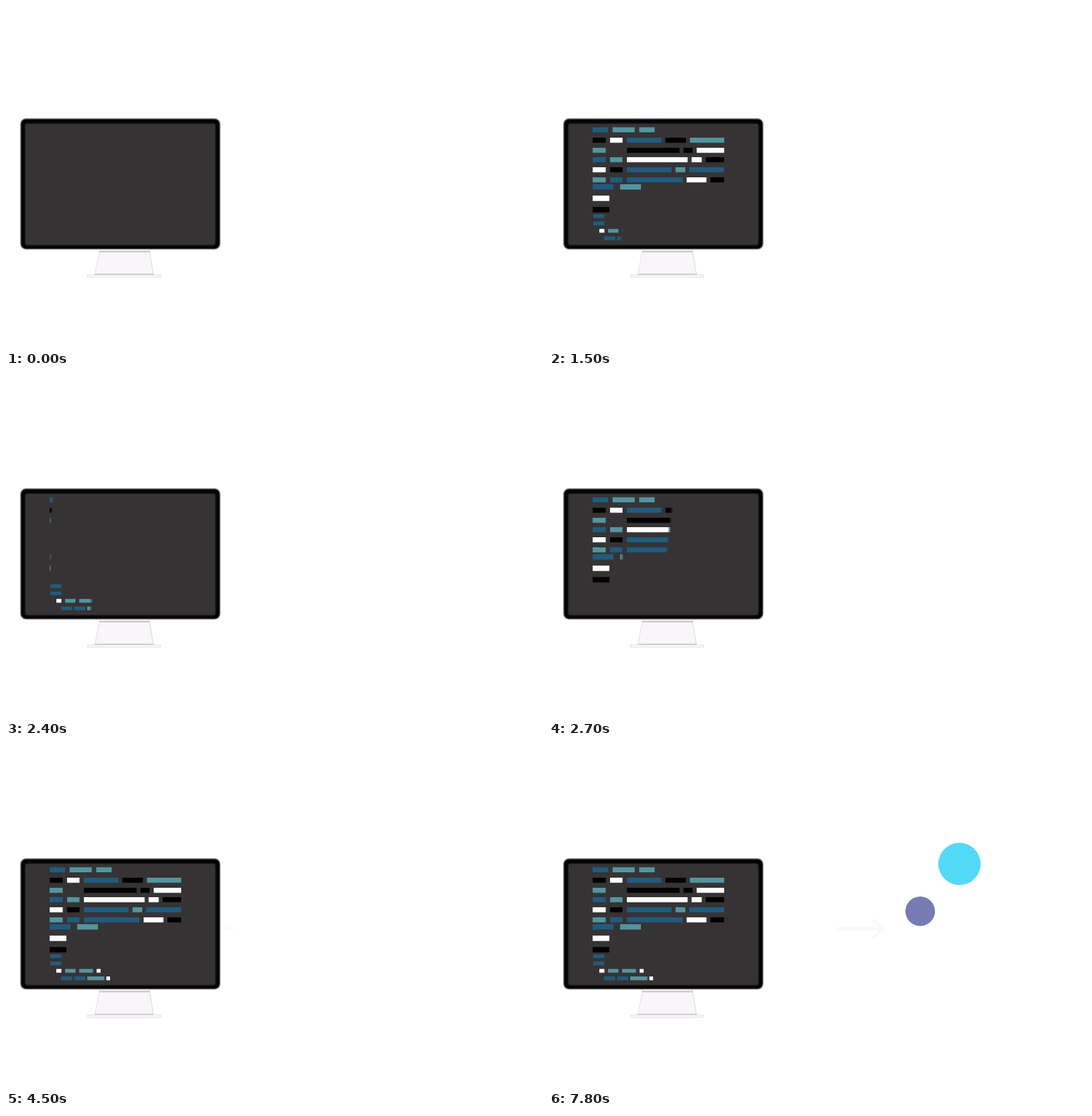
Recreate the animation shown at these times as an HTML page with a canvas. Size 800 px wide and 509 px high, loop 8000 ms.

```html
<!DOCTYPE html>
<html lang="en">
<head>
<meta charset="utf-8">
<title>Code on a monitor</title>
<style>
  html, body { margin: 0; width: 100%; height: 100%; overflow: hidden; background: #fff; }
  canvas { display: block; }
</style>
</head>
<body>
<canvas id="stage" width="800" height="509"></canvas>
<script>
const ctx = document.getElementById('stage').getContext('2d');
const LOOP = 8000, STEP = 100;
const COLORS = { B: '33,91,125', T: '83,149,159', K: '0,0,0', W: '255,255,255' };
const SCREEN = '#363335';

const clamp = v => Math.min(1, Math.max(0, v));
const ramp = (t, start, length) => clamp((t - start) / length);

// Bars laid out one after another; each word is a colour and a width.
function flow(x, y, gap, words) {
  return words.split(' ').map(word => {
    const w = +word.slice(1);
    const bar = { c: COLORS[word[0]], x, y, w };
    x += w + gap;
    return bar;
  });
}

// Two narrow columns, then three bars that share the rest of the line.
function codeLine(colors, index, split1, split2) {
  const starts = [65, 91, 116, split1, split2];
  const ends = [84.5, 109.5, split1 - 6, split2 - 6, 261];
  const y = Math.round(195.8 + 14.7 * index);
  return [...colors].map((c, i) => ({ c: COLORS[c], x: starts[i], y, w: ends[i] - starts[i] }))
    .filter(bar => bar.c);
}

const mainShare = t => ramp(t, 660, 600) - ramp(t, 1760, 700) + ramp(t, 2470, 400);
const tailShare = t => ramp(t, 1310, 400) - ramp(t, 2260, 400) + ramp(t, 2800, 400);

const groups = [
  { x: 65, w: 196, mid: 220, h: 7.5, share: mainShare, bars: [
    flow(65, 180.5, 6.7, 'B23 T33 T23'),
    codeLine('KWBKT', 0, 173.5, 210),
    codeLine('T-KKW', 1, 200.5, 220),
    codeLine('BTWWK', 2, 212.5, 233.5),
    codeLine('WKBTB', 3, 188.5, 209),
    codeLine('TBBWK', 4, 205, 240.5)] },
  { x: 65, w: 72, mid: 286, h: 8, share: mainShare,
    bars: ['B31 T31', 'W25', 'K25'].map((words, i) => flow(65, 265.2 + 17 * i, 10, words)) },
  { x: 66, w: 90, mid: 340, h: 5.6, share: tailShare, bars: [
    flow(66, 310, 0, 'B16.5'),
    flow(66, 320.8, 0, 'B16.5'),
    flow(75, 331.8, 5.5, 'W7.5 T15.5 T20.5 W6'),
    flow(82, 343, 3, 'B16.5 B16.5 T25.5 W5.5')] }
];

function box(x, y, w, h, r, fill) {
  ctx.beginPath();
  ctx.roundRect(x, y, w, h, r);
  ctx.fillStyle = fill;
  ctx.fill();
}

function line(points, color, width) {
  ctx.beginPath();
  points.forEach(([x, y]) => ctx.lineTo(x, y));
  ctx.strokeStyle = color;
  ctx.lineWidth = width;
  ctx.stroke();
}

function drawMonitor() {
  const left = [[139.5, 363], [132.5, 399]], right = [[219.5, 399], [213.5, 363]];
  ctx.beginPath();
  [...left, ...right].forEach(([x, y]) => ctx.lineTo(x, y));
  ctx.fillStyle = '#f8f6f8';
  ctx.fill();
  line(left, '#e4e2e4', 1);
  line(right, '#dad8da', 1);
  line([[139, 365.5], [214, 365.5]], '#c4c1c4', 2);
  box(121, 400, 110, 4, 1, '#dedede');
  box(122, 401, 108, 2, 0, '#fdfdfd');
  line([[132, 399.3], [220, 399.3]], '#ccc9cc', 1.5);

  // Rim that darkens from the outside in.
  for (let i = 0; i < 4; i++) {
    const inset = i * .8, tone = 190 * (1 - i / 3) ** 1.5;
    box(20.8 + inset, 166.8 + inset, 299 - 2 * inset, 196 - 2 * inset, 9 - inset, `rgb(${tone},${tone},${tone})`);
  }
  ctx.shadowColor = SCREEN;
  ctx.shadowBlur = 4;
  box(29, 175.5, 282.5, 180, 2, SCREEN);
  ctx.shadowBlur = 0;
}

// Bars are cut by a slightly slanted, soft edge.
function drawCode(t) {
  for (const g of groups) {
    const front = g.x + g.w * (g.share(t) * 1.2 - .1);
    for (const { c, x, y, w } of g.bars.flat()) {
      const edge = front - (y + g.h / 2 - g.mid) * .13;
      const end = Math.min(x + w, edge + 2);
      if (end <= x) continue;
      const fade = ctx.createLinearGradient(edge - 3, 0, edge + 2, 0);
      fade.addColorStop(0, `rgba(${c},1)`);
      fade.addColorStop(1, `rgba(${c},0)`);
      ctx.fillStyle = fade;
      ctx.fillRect(x, y, end - x, g.h);
    }
  }
}

// Eases in and out after a short pull back.
const pullBack = s => s * s * (3 - 2 * s) - 1.6 * s * (1 - s) ** 4;

function drawArrow(t) {
  if (t < 4500) return;
  ctx.save();
  ctx.translate(103 * pullBack(ramp(t, 5300, 900)), 0);
  ctx.beginPath();
  ctx.rect(320, 250, 18 + 66 * ramp(t, 4500, 300), 44);
  ctx.clip();
  ctx.lineCap = ctx.lineJoin = 'round';
  line([[329, 272], [395, 272]], '#f8f8f8', 4.5);
  line([[380, 259.5], [395, 272], [380, 284.5]], '#f8f8f8', 4.5);
  ctx.restore();
}

function drawDot(t, start, x, y, r, color) {
  ctx.globalAlpha = ramp(t, start - STEP, 2 * STEP);
  ctx.beginPath();
  ctx.arc(x, y, r, 0, Math.PI * 2);
  ctx.fillStyle = color;
  ctx.fill();
  ctx.globalAlpha = 1;
}

function draw(now) {
  const t = Math.floor(now % LOOP / STEP) * STEP;
  ctx.fillStyle = '#fff';
  ctx.fillRect(0, 0, 800, 509);
  drawMonitor();
  drawCode(t);
  drawArrow(t);
  drawDot(t, 7100, 611.5, 175.5, 31.5, '#53d9f8');
  drawDot(t, 7700, 553, 246, 22, '#777bb3');
}

const begin = performance.now();
function tick() {
  draw(performance.now() - begin);
  requestAnimationFrame(tick);
}
tick();
</script>
</body>
</html>
```
